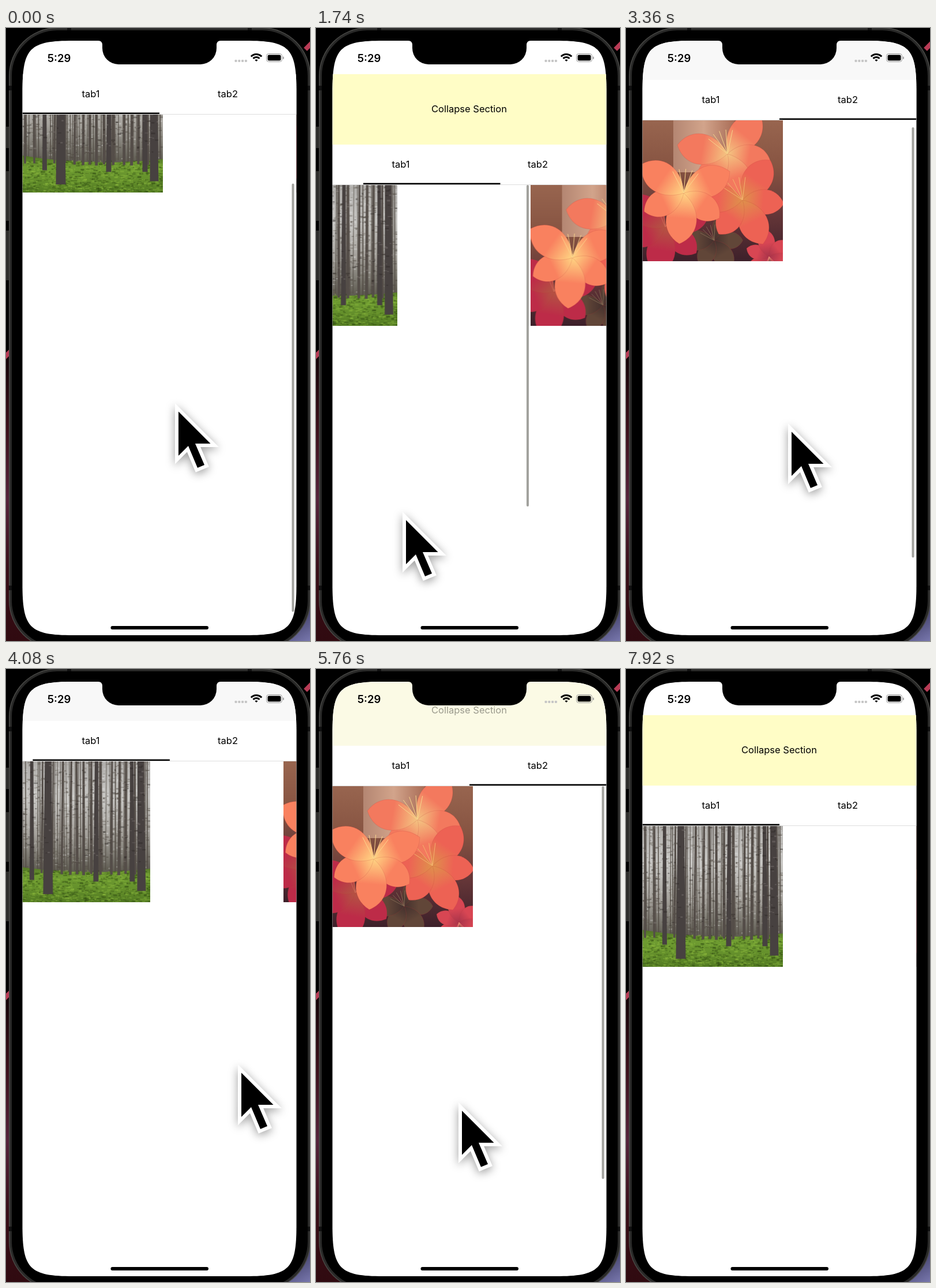
An HTML page with a canvas that plays this animation: 527 px wide and 1062 px high, repeating every 7980 ms.

```html
<!DOCTYPE html>
<html lang="en">
<head>
<meta charset="utf-8">
<title>Collapsible tabs</title>
<style>
html, body { margin: 0; width: 100%; height: 100%; overflow: hidden; background: #000; }
canvas { display: block; }
</style>
</head>
<body>
<canvas id="stage" width="527" height="1062"></canvas>
<script>
const W = 527, H = 1062, LOOP = 7980, STEP = 60;
const LEFT = 28.5, PAGE = 475, PHOTO = 244, SECTION = 122, TAB_H = 69.5;
const SWIPE = 690, RAD = Math.PI / 180;
const ctx = document.getElementById('stage').getContext('2d');

const clamp = v => Math.min(1, Math.max(0, v));
const ease = v => { const u = clamp(v); return u * u * (3 - 2 * u); };

// Each move eases the value from wherever it was to its new goal.
function follow(start, moves) {
  return t => moves.reduce((v, m) => v + (m.to - v) * ease((t - m.at) / m.time), start);
}

const scrolls = [
  { at: 120, time: 1080, to: 0 },
  { at: 2800, time: 500, to: 112 },
  { at: 5507, time: 600, to: 0 },
];
const swipes = [1502, 3480, 4596, 6690].map((at, i) => ({ at, time: SWIPE, to: i % 2 ? 0 : PAGE }));
const strokes = [
  { at: 120, time: 840, x: 285, y: 838 },
  { at: 1440, time: 300, x: 150, y: 838 },
  { at: 2160, time: 440, x: 281, y: 797 },
  { at: 2800, time: 500, x: 281, y: 685 },
  { at: 3450, time: 350, x: 402, y: 685 },
  { at: 4560, time: 300, x: 247, y: 685 },
  { at: 5470, time: 590, x: 247, y: 820 },
  { at: 6600, time: 300, x: 380, y: 820 },
  { at: 7200, time: 540, x: 380, y: 1080 },
];
const axis = (start, key) => follow(start, strokes.map(s => ({ ...s, to: s[key] })));

const scrollAt = follow(231, scrolls), pageAt = follow(0, swipes);
const cursorX = axis(293, 'x'), cursorY = axis(650, 'y');

function random(seed) {
  return () => (seed = (seed * 16807) % 2147483647) / 2147483647;
}

function picture(paint) {
  const c = document.createElement('canvas');
  c.width = c.height = PHOTO;
  paint(c.getContext('2d'));
  return c;
}

function gradient(g, x0, y0, x1, y1, ...colors) {
  const fill = g.createLinearGradient(x0, y0, x1, y1);
  colors.forEach((c, i) => fill.addColorStop(i / (colors.length - 1), c));
  return fill;
}

const forest = picture(g => {
  const rnd = random(71);
  const specks = (count, top, height, colors) => {
    for (let i = 0; i < count; i++) {
      g.fillStyle = colors[i % colors.length];
      g.fillRect(rnd() * PHOTO - 3, top + rnd() * height, 2 + rnd() * 5, 1 + rnd() * 2);
    }
  };
  // Wider trunks stand nearer, so they end lower.
  const trunk = (x, w, color) => {
    const end = 184 + w * 2.7, lean = (rnd() - 0.5) * 4;
    g.fillStyle = color;
    g.beginPath();
    g.moveTo(x + lean - w * 0.33, 0);
    g.lineTo(x + lean + w * 0.33, 0);
    g.lineTo(x + w / 2, end);
    g.lineTo(x - w / 2, end);
    g.fill();
  };
  g.fillStyle = gradient(g, 0, 0, 0, 190, '#b0aeab', '#c8c7c4', '#a5a29c', '#5f5c52');
  g.fillRect(0, 0, PHOTO, PHOTO);
  specks(900, 0, 185, ['rgba(70,64,56,.4)', 'rgba(225,225,224,.3)', 'rgba(90,84,72,.3)']);
  for (let x = 0; x < PHOTO; x += 3 + rnd() * 6) trunk(x, 1 + rnd() * 2, 'rgba(84,77,70,.8)');
  g.fillStyle = gradient(g, 0, 178, 0, PHOTO, '#4c6b24', '#6f9c31', '#648f2b', '#527a22');
  g.beginPath();
  g.moveTo(0, 180);
  g.quadraticCurveTo(120, 200, PHOTO, 186);
  g.lineTo(PHOTO, PHOTO);
  g.lineTo(0, PHOTO);
  g.fill();
  specks(900, 188, 56, ['rgba(48,76,18,.4)', 'rgba(138,182,62,.4)']);
  for (let x = 5; x < PHOTO; x += 10 + rnd() * 12) trunk(x, 3 + rnd() * 2, '#544d48');
  for (const [x, w] of [[39, 8], [67, 17], [150, 9], [213, 9], [229, 15]]) trunk(x, w, '#474140');
  specks(260, 0, 175, ['rgba(40,36,34,.4)', 'rgba(150,144,138,.3)']);
});

const flower = picture(g => {
  const petal = (len, tip, base) => {
    const wide = len * 0.4;
    g.fillStyle = gradient(g, 0, 0, len, 0, base, tip, tip);
    g.beginPath();
    g.moveTo(0, 0);
    g.bezierCurveTo(len * 0.3, -wide, len * 0.8, -wide, len, 0);
    g.bezierCurveTo(len * 0.8, wide, len * 0.3, wide, 0, 0);
    g.fill();
    g.strokeStyle = 'rgba(190,60,60,.2)';
    g.stroke();
  };
  // Five petals a sixth of a turn apart leave one gap, where the stamens rise.
  const bloom = (x, y, size, turn, tip, base, thread) => {
    for (let i = 0; i < 5; i++) {
      g.save();
      g.translate(x, y);
      g.rotate((turn + i * 60) * RAD);
      petal(size * (i % 2 ? 0.9 : 1.05), tip, base);
      g.restore();
    }
    g.strokeStyle = thread;
    for (let i = -2; i <= 2; i++) {
      const a = (turn - 60 + i * 16) * RAD, len = size * 0.5;
      g.beginPath();
      g.moveTo(x, y);
      g.lineTo(x + len * Math.cos(a), y + len * Math.sin(a));
      g.stroke();
    }
  };
  g.filter = 'blur(.7px)';
  g.fillStyle = gradient(g, 0, 0, 0, PHOTO, '#98654f', '#875442', '#653638', '#3d202a');
  g.fillRect(0, 0, PHOTO, PHOTO);
  g.fillStyle = gradient(g, 54, 0, 160, 0, '#b48672', '#d2a48b', '#a96d57');
  g.fillRect(54, 0, 106, 90);
  bloom(125, 208, 55, -60, '#614638', '#44302d', '#806751');
  bloom(40, 185, 78, -20, '#bd2b48', '#b35543', '#c96855');
  bloom(220, 236, 46, 140, '#d84653', '#a9344b', '#e58170');
  bloom(148, 58, 84, -50, '#f3795e', '#f4c582', '#f6d58c');
  bloom(174, 138, 80, -55, '#ed6254', '#df914c', '#f2b36d');
  bloom(72, 126, 84, -25, '#f9815f', '#ffd483', '#fbd58c');
});

function rounded(x, y, w, h, r, fill) {
  ctx.beginPath();
  ctx.roundRect(x, y, w, h, r);
  if (fill) {
    ctx.fillStyle = fill;
    ctx.fill();
  }
}

function box(x, y, w, h, fill) {
  ctx.fillStyle = fill;
  ctx.fillRect(x, y, w, h);
}

function outline(points) {
  ctx.beginPath();
  points.forEach(([x, y]) => ctx.lineTo(x, y));
  ctx.closePath();
}

function label(text, x, y, size = 16.5, weight = 400) {
  ctx.font = `${weight} ${size}px Inter, Roboto, sans-serif`;
  ctx.textAlign = 'center';
  ctx.fillStyle = '#000';
  ctx.fillText(text, x, y);
}

function phone() {
  box(0, 0, W, H, '#000');
  box(0, 570, 60, 492, gradient(ctx, 0, 570, 0, H, '#140407', '#3c101a', '#55233a', '#380e17', '#300a10'));
  box(470, 990, 57, 72, gradient(ctx, 490, 1000, W, H, '#28274a', '#7877ad'));
  ctx.lineWidth = 8;
  ctx.strokeStyle = '#b83c56';
  for (const [x, y] of [[0, 568], [W, 29]]) {
    ctx.beginPath();
    ctx.moveTo(x - 8, y + 8);
    ctx.lineTo(x + 8, y - 8);
    ctx.stroke();
  }
  for (const [y, h] of [[171, 37], [248, 86], [351, 86]]) box(0, y, 5, h, '#2d2d2b');
  rounded(5, -1, 523, 1077, 84, '#4b4b48');
  rounded(6.5, 0.5, 520, 1074, 82, '#292928');
  rounded(10, 4, 513, 1067, 79, '#000');
  for (const y of [100, 966]) for (const x of [5, 523]) box(x, y, 5, 8, '#111');
  for (const x of [106, 419]) box(x, 0, 7, 4, '#111');
}

// Screen outline with continuous corners, which ease in earlier than a plain arc.
function screen() {
  const r = 88, k = r * 0.14;
  const x0 = LEFT, y0 = 22, x1 = LEFT + PAGE, y1 = 1052;
  ctx.beginPath();
  ctx.moveTo(x0 + r, y0);
  ctx.lineTo(x1 - r, y0);
  ctx.bezierCurveTo(x1 - k, y0, x1, y0 + k, x1, y0 + r);
  ctx.lineTo(x1, y1 - r);
  ctx.bezierCurveTo(x1, y1 - k, x1 - k, y1, x1 - r, y1);
  ctx.lineTo(x0 + r, y1);
  ctx.bezierCurveTo(x0 + k, y1, x0, y1 - k, x0, y1 - r);
  ctx.lineTo(x0, y0 + r);
  ctx.bezierCurveTo(x0, y0 + k, x0 + k, y0, x0 + r, y0);
  ctx.fillStyle = '#fff';
  ctx.fill();
}

function statusBar() {
  label('5:29', 92, 58.5, 18.5, 600);
  for (let i = 0; i < 4; i++) rounded(396.5 + i * 5.8, 55, 4, 4, 1.2, '#c6c6c6');
  ctx.strokeStyle = '#000';
  ctx.lineWidth = 3;
  for (const r of [2, 7.5, 12.5]) {
    ctx.beginPath();
    ctx.arc(434, 58, r, -137 * RAD, -43 * RAD);
    ctx.stroke();
  }
  rounded(451.5, 44.5, 27, 14, 4);
  ctx.strokeStyle = '#999';
  ctx.lineWidth = 1;
  ctx.stroke();
  rounded(453.5, 46.5, 23, 10, 2.5, '#000');
  rounded(480, 49.5, 1.8, 4.5, 1, '#999');
}

function notch() {
  rounded(167, 20, 198, 43, [0, 0, 28, 28], '#000');
  for (const side of [-1, 1]) {
    const x = 266 + side * 99;
    ctx.beginPath();
    ctx.moveTo(x, 30);
    ctx.quadraticCurveTo(x, 22, x + side * 7, 22);
    ctx.lineTo(x, 21);
    ctx.fill();
  }
}

function scrollBar(t, scroll, x) {
  const last = scrolls.filter(s => s.at <= t).pop() || scrolls[0];
  const owner = pageAt(last.at);
  const top = Math.max(272 - scroll, 172 + 0.82 * (scroll - 112));
  ctx.globalAlpha = clamp((last.at + last.time + 800 - t) / 200);
  rounded(x + owner + 467.5, top, 4, 829 + 0.79 * scroll - top, 2, '#a1a19d');
  ctx.globalAlpha = 1;
}

function pages(t, scroll) {
  const x = LEFT - 0.5 - pageAt(t), y = 272 - scroll;
  ctx.save();
  ctx.beginPath();
  ctx.rect(LEFT, 202 - Math.min(scroll, SECTION) + TAB_H, PAGE, H);
  ctx.clip();
  ctx.drawImage(forest, x, y);
  ctx.drawImage(flower, x + PAGE, y);
  scrollBar(t, scroll, x);
  ctx.restore();
}

function header(t, scroll) {
  const shift = Math.min(scroll, SECTION), top = 202 - shift;
  ctx.globalAlpha = clamp((SECTION - shift) / 10);
  box(LEFT, top - SECTION, PAGE, SECTION, '#f8f8f8');
  ctx.globalAlpha = clamp(1 - shift / 112);
  box(LEFT, top - SECTION, PAGE, SECTION, '#fffdc6');
  label('Collapse Section', 265.5, top - 56);
  ctx.globalAlpha = 1;
  box(LEFT, top, PAGE, TAB_H, '#fff');
  label('tab1', 147, top + 40);
  label('tab2', 384.5, top + 40);
  box(LEFT, top + 69, PAGE, 1, '#dedede');
  box(LEFT + pageAt(t - 26) / 2, top + 66.5, PAGE / 2, 2.5, '#000');
}

function cursor(x, y) {
  ctx.save();
  ctx.translate(x, y);
  outline([[6, 14.5], [6, 91], [23, 74], [39, 112], [51, 107], [35, 70], [61.5, 70]]);
  ctx.shadowColor = 'rgba(0,0,0,.4)';
  ctx.shadowBlur = 16;
  ctx.shadowOffsetY = 4;
  ctx.strokeStyle = '#fff';
  ctx.lineWidth = 12;
  ctx.stroke();
  ctx.shadowColor = 'transparent';
  ctx.fillStyle = '#000';
  ctx.fill();
  ctx.restore();
}

function draw(t) {
  const scroll = scrollAt(t);
  phone();
  ctx.save();
  screen();
  ctx.clip();
  pages(t, scroll);
  header(t, scroll);
  statusBar();
  rounded(181.5, 1036, 169.5, 6, 3, '#000');
  ctx.restore();
  notch();
  cursor(cursorX(t), cursorY(t));
}

function tick() {
  draw(Math.floor(performance.now() % LOOP / STEP) * STEP);
  requestAnimationFrame(tick);
}
tick();
</script>
</body>
</html>
```
